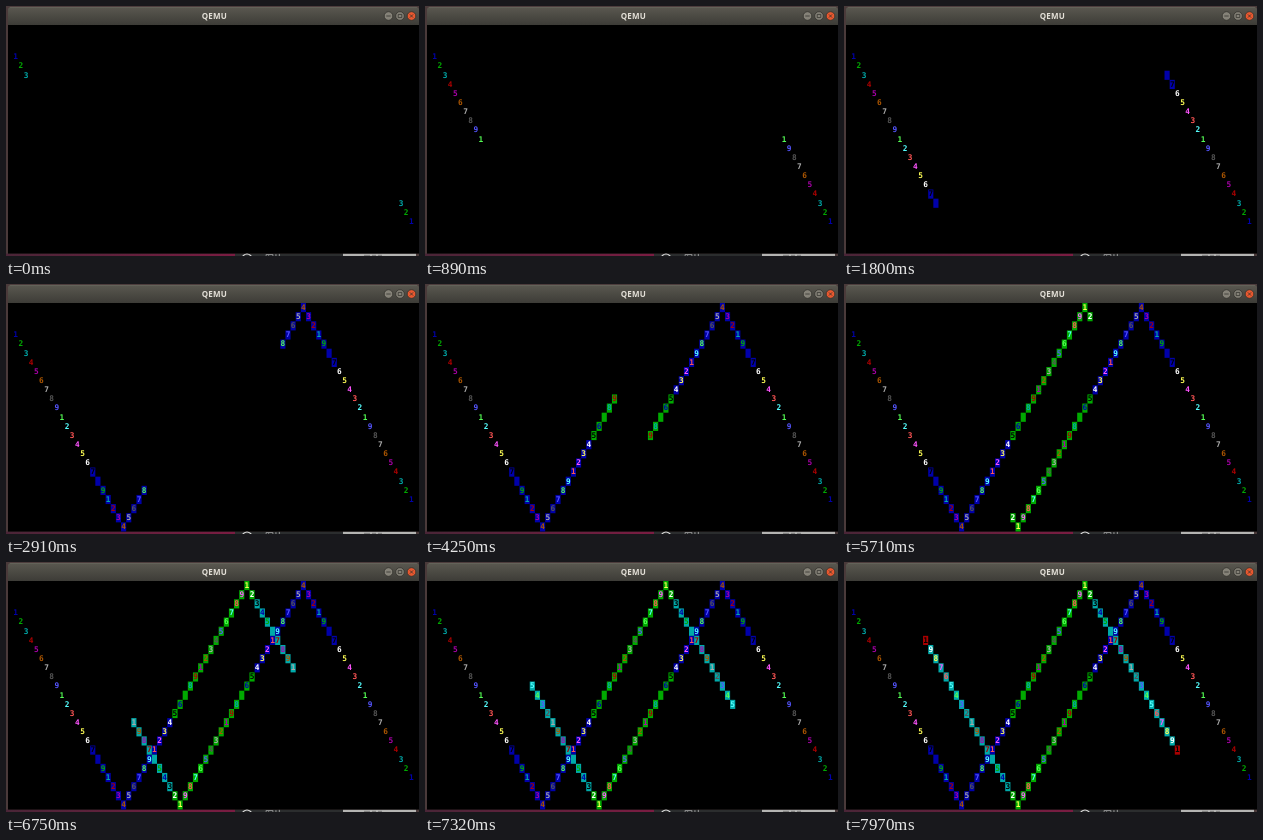
Recreate the animation shown at these times as an HTML page. Size 413 px wide and 250 px high, loop 8000 ms.

```html
<!DOCTYPE html>
<html lang="en">
<head>
<meta charset="utf-8">
<title>QEMU</title>
<style>
  html, body { margin: 0; width: 100%; height: 100%; overflow: hidden; background: #000; }
  svg { display: block; width: 100%; height: 100%; }
  .title { font: bold 8px "Open Sans", "Noto Sans", sans-serif; letter-spacing: .2px; fill: #e4e0d8; text-anchor: middle; }
  .label { font: 9px "Noto Sans CJK SC", "Noto Sans CJK", sans-serif; fill: #c4c4c4; }
  #screen text { font: bold 7.8px "DejaVu Sans Mono", monospace; text-anchor: middle; text-rendering: geometricPrecision; }
</style>
</head>
<body>
<svg viewBox="0 0 413 250">
  <defs>
    <linearGradient id="bar" x2="0" y2="1">
      <stop offset="0" stop-color="#5a5850"/>
      <stop offset="1" stop-color="#3d3c37"/>
    </linearGradient>
    <linearGradient id="desk">
      <stop offset="0" stop-color="#4a2537"/>
      <stop offset="1" stop-color="#7a1c42"/>
    </linearGradient>
  </defs>

  <rect width="413" height="250" fill="#4a3a3a"/>
  <rect y="247.5" width="229" height="2.5" fill="url(#desk)"/>
  <rect x="229" y="247.5" width="108" height="2.5" fill="#2b2d2e"/>
  <rect x="337" y="247.5" width="73" height="2.5" fill="#b4b4b2"/>
  <path d="M358 249.3h6m2 0h4m2 0h4" stroke="#777" stroke-width="1"/>
  <rect x="2" y="18" width="411" height="229.6" fill="#000"/>
  <circle cx="241" cy="253" r="5" fill="none" stroke="#d8d8d8" stroke-width="1.2"/>
  <text class="label" x="259" y="255.5">图片</text>

  <path d="M2 19V4q0-3 3-3H410q3 0 3 3V19z" fill="url(#bar)"/>
  <path d="M4 1.4H411" stroke="#6b6960" stroke-width=".7"/>
  <text class="title" x="208.3" y="13.2">QEMU</text>
  <g stroke="#34332e" stroke-width=".8">
    <circle cx="382.5" cy="10" r="4.3" fill="#858278"/>
    <circle cx="394" cy="10" r="4.3" fill="#858278"/>
    <circle cx="405.5" cy="10" r="4.3" fill="#e9582f"/>
    <path d="M380.3 10h4.4M392.2 8.4h3.6v3.2h-3.6zM403.9 8.4l3.2 3.2m0-3.2l-3.2 3.2" fill="none"/>
  </g>

  <g id="screen"></g>
</svg>
<script>
const NS = 'http://www.w3.org/2000/svg';
const LOOP = 8000, ROWS = 25, COLS = 80, FIRST = 3, TOTAL = 64;
const LEFT = 2, TOP = 19, CELL_W = 411 / COLS, CELL_H = 228.5 / ROWS;
const PALETTE = ['#000', '#00a', '#0a0', '#0aa', '#a00', '#a0a', '#a50', '#aaa',
                 '#555', '#55f', '#5f5', '#5ff', '#f55', '#f5f', '#ff5', '#fff'];

// [step, ms]: the pace of the program, linear in between
const PACE = [[0, 0], [1, 110], [3, 390], [9, 1130], [10, 1250], [13, 1660], [14, 1800],
  [17, 2150], [18, 2300], [23, 2910], [24, 3070], [25, 3250], [27, 3470], [28, 3630],
  [30, 3860], [31, 4030], [33, 4250], [34, 4390], [35, 4530], [40, 5130], [44, 5710],
  [49, 6340], [50, 6490], [51, 6610], [52, 6750], [58, 7520], [59, 7630], [61, 7970], [61, LOOP]];

const screen = document.getElementById('screen');

function add(parent, tag, attrs) {
  const el = document.createElementNS(NS, tag);
  for (const key in attrs) el.setAttribute(key, attrs[key]);
  return parent.appendChild(el);
}

function drawCell(parent, row, col, char, attr) {
  const x = LEFT + col * CELL_W, y = TOP + row * CELL_H;
  const back = attr >> 4;
  if (back) add(parent, 'rect', { x, y, width: CELL_W, height: CELL_H, fill: PALETTE[back] });
  add(parent, 'text', { x: x + CELL_W / 2, y: y + 6.9, fill: PALETTE[attr & 15] }).textContent = char;
}

// Two digits bounce between top and bottom, each the other turned by 180 degrees
const steps = Array.from({ length: TOTAL }, (_, i) => {
  const g = add(screen, 'g', { visibility: 'hidden' });
  const last = ROWS - 1;
  const phase = (i + 3) % (2 * last);
  const row = phase > last ? 2 * last - phase : phase;
  const col = i + 1, char = i % 9 + 1, attr = i + 1;
  drawCell(g, row, col, char, attr);
  drawCell(g, last - row, COLS - 1 - col, char, attr);
  return g;
});

function countAt(t) {
  const i = PACE.findIndex(p => p[1] > t);
  const [k0, t0] = PACE[i - 1], [k1, t1] = PACE[i];
  return FIRST + Math.floor(k0 + (k1 - k0) * (t - t0) / (t1 - t0) + 1e-6);
}

let shown = -1;
function render(t) {
  const count = countAt(t);
  if (count === shown) return;
  shown = count;
  steps.forEach((g, i) => g.setAttribute('visibility', i < count ? 'visible' : 'hidden'));
}

const start = performance.now();
function tick() {
  render((performance.now() - start) % LOOP);
  requestAnimationFrame(tick);
}
tick();
</script>
</body>
</html>
```
